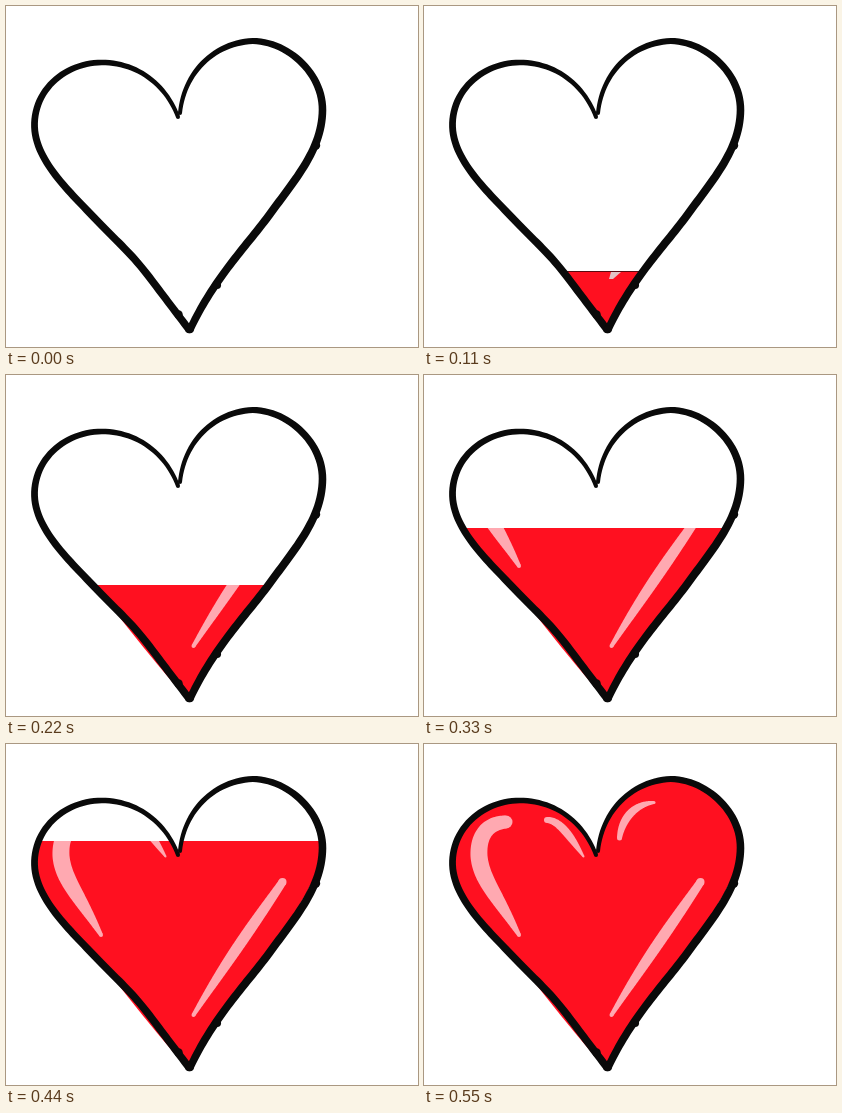
These frames come from a looping animation (412 by 341 pixels, 660 ms). An HTML page:

```html
<!DOCTYPE html>
<html lang="en">
<head>
<meta charset="utf-8">
<title>Filling heart</title>
<style>
  html, body { margin: 0; width: 100%; height: 100%; overflow: hidden; background: #fff; }
  svg { display: block; width: 100vw; height: 100vh; }
</style>
</head>
<body>
<svg viewBox="0 0 412 341">
  <defs>
    <clipPath id="level"><rect id="mask" width="412" height="341"/></clipPath>
  </defs>
  <g clip-path="url(#level)">
    <g fill="#ff1020">
      <path id="body"/>
      <path id="spill" d="M104 230 Q138 274 168 309 L174 304 Z"/>
    </g>
    <path id="gap" fill="none" stroke="#fff" stroke-width="1.2" d="M305 141 Q301 151 295 159"/>
    <g id="shine" fill="#ffa9b1"></g>
    <path id="chip" fill="#e3c3c5" d="M187 266 H197 L189 273 H185 Z"/>
  </g>
  <path id="surface" stroke="#5a0a10" d="M142 265.5 H217"/>
  <g id="outline" fill="#0a0a0a"></g>
</svg>
<script>
const $ = id => document.getElementById(id);
const STEP = 110, STEPS = 6;
const TIP = 322.5, RISE = 56.5;

const leftSide = 'M172 111 C161 81 134 57 97 56.5 S29 83 28.5 118 ' +
  'S62 184 87.5 211 S126 247 150 280 L183 323.5';
const rightSide = 'M174 107 C178 66 209 36 248 35 C281 36 316 66 316.5 103 ' +
  'C316.5 143 290 172 262.5 210 C237 244 208 273 184 323.5';

function make(tag, attrs) {
  const el = document.createElementNS('http://www.w3.org/2000/svg', tag);
  for (const key in attrs) el.setAttribute(key, attrs[key]);
  return el;
}

function sample(d, n = 120) {
  const path = make('path', { d });
  const length = path.getTotalLength();
  return Array.from({ length: n + 1 }, (_, i) => {
    const { x, y } = path.getPointAtLength(length * i / n);
    return [x, y];
  });
}

const polygon = pts => 'M' + pts.map(p => p.map(v => v.toFixed(2)).join(' ')).join('L') + 'Z';

// Pen stroke whose width runs from one end to the other and swells between.
function brush(parent, d, from, to, swell) {
  const line = sample(d), last = line.length - 1;
  const width = t => from + (to - from) * t + swell * Math.sin(Math.PI * t);
  const side = sign => line.map(([x, y], i) => {
    const a = line[Math.max(0, i - 1)], b = line[Math.min(last, i + 1)];
    const dx = b[0] - a[0], dy = b[1] - a[1];
    const k = sign * width(i / last) / 2 / Math.hypot(dx, dy);
    return [x - dy * k, y + dx * k];
  });
  $(parent).append(make('path', { d: polygon([...side(1), ...side(-1).reverse()]) }));
  dot(parent, ...line[0], from / 2);
  dot(parent, ...line[last], to / 2);
}

function dot(parent, cx, cy, r) {
  $(parent).append(make('circle', { cx, cy, r }));
}

$('body').setAttribute('d', polygon([...sample(leftSide), ...sample(rightSide).reverse()]));

brush('outline', leftSide, 4, 7.5, 1.3);
brush('outline', rightSide, 4, 7.5, 2);
// Uneven spots where the pen paused.
dot('outline', 172.5, 308.5, 4.2);
dot('outline', 310, 139.5, 4.2);
dot('outline', 211, 279, 4.1);

brush('shine', 'M276.5 138 C262 160 222 215 187.5 271', 8, 4, 5);
brush('shine', 'M82 78 C63 79 54 92 55 112 C57 135 72 150 95 191', 13, 4, 8);
brush('shine', 'M123 76 C135 76 146 92 159.5 112.5', 6, 2, 4);
brush('shine', 'M230 58.5 C211 60 198 74 195.5 94', 3, 5, 4);

const show = (id, on) => $(id).setAttribute('visibility', on ? 'visible' : 'hidden');

function draw(ms) {
  const step = Math.floor(ms / STEP) % STEPS;
  const full = step === STEPS - 1;
  const level = full ? 0 : step ? Math.round(TIP - RISE * step) : 341;
  $('mask').setAttribute('y', level);
  show('surface', step === 1);
  show('chip', step === 1);
  show('shine', step > 1);
  show('spill', step > 1);
  show('gap', step > 3);
}

const start = performance.now();
function tick() {
  draw(performance.now() - start);
  requestAnimationFrame(tick);
}
draw(0);
requestAnimationFrame(tick);
</script>
</body>
</html>
```
